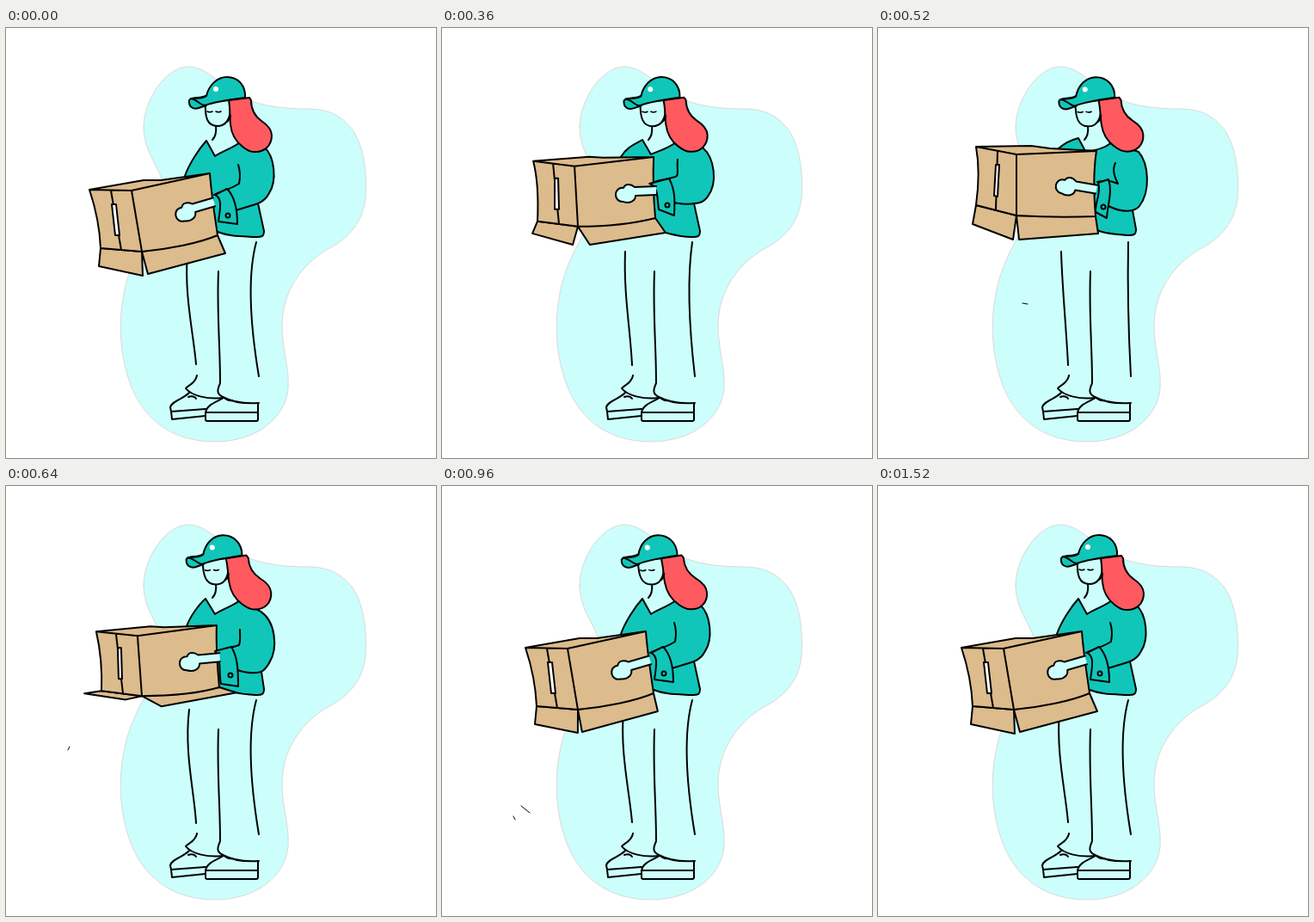
Animation of 500x500 px, one loop 1540 ms. Source, as an HTML page:

```html
<!DOCTYPE html>
<html>
<head>
<meta charset="utf-8">
<style>
html, body { margin: 0; width: 100%; height: 100%; overflow: hidden; background: #fff; }
svg { display: block; width: 100vw; height: 100vh; }
.line { fill: none; }
.teal { fill: #10c6b9; }
.skin { fill: #ccfffb; }
.card { fill: #dcbb8c; }
</style>
</head>
<body>
<svg viewBox="0 0 500 500" stroke="#000" stroke-width="2" stroke-linejoin="round" stroke-linecap="round">
  <path class="skin" stroke="#d9cfd0" stroke-width=".8" d="M160 115C160 85 185 45 212 45C232 46 240 58 262 72C282 88 310 93 345 94C372 93 388 100 402 117C417 138 420 170 418 198C415 225 400 243 378 255C350 270 322 300 321 345C321 375 330 395 328 420C324 455 290 481 243 481C195 481 163 457 147 420C128 375 130 320 145 280C158 245 182 215 184 195C185 165 160 150 160 115Z"/>
  <path class="line" id="legs"/>
  <g class="line">
    <path d="M247 283C245 330 249 370 249 412M222 404C220 414 212 415 209 419C216 428 235 432 252 430M249 413C246 420 244 425 252 429C265 436 280 437 294 436"/>
    <path d="M213 424C207 431 192 434 191 441L192 446L232 443M192 446L193 455L232 451M212 429Q218 427 221 431"/>
    <path d="M253 430C247 434 234 437 232 447H293M232 447V455Q232 457 234 457H291Q293 457 293 455V436M254 430Q258 434 263 433"/>
  </g>
  <path class="line" d="M244 113C245 122 243 127 240 130"/>
  <path class="teal" id="torso"/>
  <path class="line" id="sleeve"/>
  <g id="head">
    <path class="skin" d="M232 86C231 104 234 114 246 114C255 114 259 108 261 98V84Z"/>
    <path fill="#ff5a60" d="M259 84C261 95 260 104 261 112C262 122 267 132 275 138C280 142 284 144 288 144C301 145 309 136 309 125C309 117 303 112 297 108C290 103 285 96 285 84L283 81Z"/>
    <path class="line" d="M261 102Q260 107 257 109"/>
    <path class="line" stroke-width="1.6" d="M234 97q3 1.5 6 0m4 0q3 1.5 6 0"/>
    <path class="teal" d="M234 78C226 83 216 79 213 84C212 92 218 95 224 93L233 90Z"/>
    <path class="teal" d="M233 79C236 66 246 57 257 57C269 57 279 66 278 81C262 83 245 85 231 90C226 90 222 83 215 82C220 81 228 83 233 79Z"/>
    <circle cx="244" cy="71" r="3" fill="#fff" stroke="none"/>
  </g>
  <path class="card" id="flaps"/>
  <path class="card" id="box"/>
  <path fill="#fff" id="slot"/>
  <path class="teal" id="cuff"/>
  <circle class="line" id="button" r="2.5"/>
  <path class="skin" id="hand" d="M36 -9L11 -8C6 -12 0 -12 -2 -7C-14 -8 -14 9 -3 9C5 12 12 8 12 2L36 1"/>
  <path class="line" id="speck" stroke-width="1"/>
</svg>
<script>
const LOOP = 1540;
const times = [0, 100, 360, 520, 640, 840, 1260, LOOP];
const bodyOrder = [0, 0, 1, 2, 3, 0, 0, 0];
const flapOrder = [0, 0, 1, 2, 3, 4, 5, 0];

// Poses: lowered, rising, raised, dropping
const shapes = {
  legs: [
    'M211 262C207 310 218 355 221 391M291 249C280 290 284 345 294 405',
    'M213 260C211 310 219 350 221 392M291 249C285 290 287 345 294 405',
    'M213 260C214 300 219 350 221 392M291 249C290 300 291 350 294 405',
    'M213 260C207 310 219 355 221 392M291 249C280 290 284 345 294 405'],
  torso: [
    'M208 172C213 158 224 141 233 131L243 149C252 143 263 140 272 133L300 138C313 150 315 178 306 192C303 198 298 202 293 204L300 236C300 243 297 243 290 243C272 242 258 242 246 237L220 220Z',
    'M208 150C215 138 225 135 233 130L243 147C252 143 263 140 272 133L303 139C317 151 321 180 309 196C305 202 298 204 293 204L300 236C300 243 297 243 290 243C278 243 268 240 260 238L220 215Z',
    'M210 140C217 134 225 130 233 128L241 143C252 143 263 140 272 133L303 144C315 158 317 190 304 207C302 210 299 211 296 212L300 234C300 241 297 241 290 241C276 240 265 239 257 236L220 210Z',
    'M210 163C214 152 224 138 232 131L243 149C252 143 263 140 272 133L296 146C313 157 317 188 306 206C303 211 299 215 297 216L300 236C300 243 297 243 290 243C274 242 260 240 248 234L220 220Z'],
  sleeve: [
    'M270 159C273 168 272 176 271 181C262 187 252 189 242 194M293 204C284 207 274 210 264 213',
    'M274 153C273 162 275 168 273 172C265 176 252 176 245 180M293 204C284 206 276 204 270 203',
    'M276 157C272 165 275 173 279 181C270 177 262 177 255 179M296 212C287 214 276 211 268 207',
    'M272 167C272 175 273 180 271 185C262 188 252 190 245 193M297 216C288 219 278 217 269 214'],
  box: [
    'M97 188L160 177L180 177L237 169L146 189ZC103 206 109 232 110 256L158 260L146 189ZM146 189L237 169C239 195 243 220 246 241C225 250 190 257 158 260ZM122 189L134 258',
    'M106 155L171 150L187 151L246 150L154 161ZC112 178 112 202 111 225L158 231L154 161ZM154 161L246 150C245 175 246 200 248 221C225 227 190 231 158 231ZM129 158L136 228',
    'M114 138L178 137L200 140L254 143L161 147ZC118 160 117 184 114 206L161 218L161 147ZM161 147L254 143C250 168 251 195 253 219C225 220 195 220 161 218ZM139 143L137 212',
    'M105 169L168 163L184 164L245 162L153 174ZC110 191 112 215 111 238L158 244L153 174ZM153 174L245 162C244 188 246 212 248 234C225 241 190 244 158 244ZM128 172L136 241'],
  slot: [
    'M123 205L128 205L132 241L127 241Z',
    'M131 175L135 175L136 211L131 211Z',
    'M137 159L141 159L139 196L135 195Z',
    'M130 188L134 188L135 224L131 224Z'],
  cuff: [
    'M243 194C252 198 249 210 247 225L269 228C269 210 266 196 257 187Z',
    'M241 181C252 184 250 199 252 211L270 218C271 200 271 188 264 175Z',
    'M256 180C260 192 252 203 253 214L266 221C267 205 273 190 268 176Z',
    'M243 192C251 202 247 215 250 230L270 233C270 212 269 198 262 187Z']
};
const flaps = [
  'M110 256L108 277L159 288L158 260ZM158 260L165 286L255 262L246 241Z',
  'M111 225L105 239L152 252L158 231ZM158 231L172 252L260 238L248 221Z',
  'M114 206L110 228L157 246L161 218ZM161 218L164 246L256 239L253 219Z',
  'M111 238L91 241L139 248L158 244ZM158 244L181 256L268 240L248 234Z',
  'M110 256L108 277L158 287L158 260ZM158 260L163 286L251 262L246 241Z',
  'M110 256L108 277L157 287L158 260ZM158 260L162 286L250 263L246 241Z'];
const handPoses = ['translate(208 215) rotate(-14)', 'translate(213 193) rotate(0)',
  'translate(218 184) rotate(12)', 'translate(213 205) rotate(-3)'];
const buttonPoses = ['translate(258 218)', 'translate(262 206)', 'translate(262 208)', 'translate(261 220)'];
const specks = [[520, 'M168 320L174 321'], [640, 'M74 303L72 307'],
  [960, 'M92 372L102 380M83 384L85 388'], [1260, 'M88 324L83 337']];

const el = id => document.getElementById(id);

// Blend every number of two equally built strings
function mix(a, b, k) {
  const target = b.match(/-?\d+/g);
  let i = 0;
  return a.replace(/-?\d+/g, n => (+n + (target[i++] - n) * k).toFixed(2));
}

function draw(now) {
  const t = now % LOOP;
  let i = 0;
  while (t >= times[i + 1]) i++;
  const u = (t - times[i]) / (times[i + 1] - times[i]);
  const k = i % 2 ? u * u : u * (2 - u);
  const pose = (list, order = bodyOrder) => mix(list[order[i]], list[order[i + 1]], k);

  for (const id in shapes) el(id).setAttribute('d', pose(shapes[id]));
  el('flaps').setAttribute('d', pose(flaps, flapOrder));
  el('hand').setAttribute('transform', pose(handPoses));
  el('button').setAttribute('transform', pose(buttonPoses));

  const phase = t < 920 ? t / 920 : (LOOP - t) / (LOOP - 920);
  const tilt = (1 - Math.cos(Math.PI * phase)) / 2;
  el('head').setAttribute('transform',
    `matrix(1 ${-.03 * tilt} ${.08 * tilt} 1 ${-10.96 * tilt} ${7.95 * tilt})`);

  const speck = specks.find(s => Math.abs(t - s[0]) < 40);
  el('speck').setAttribute('d', speck ? speck[1] : '');
  requestAnimationFrame(draw);
}
draw(0);
</script>
</body>
</html>
```
